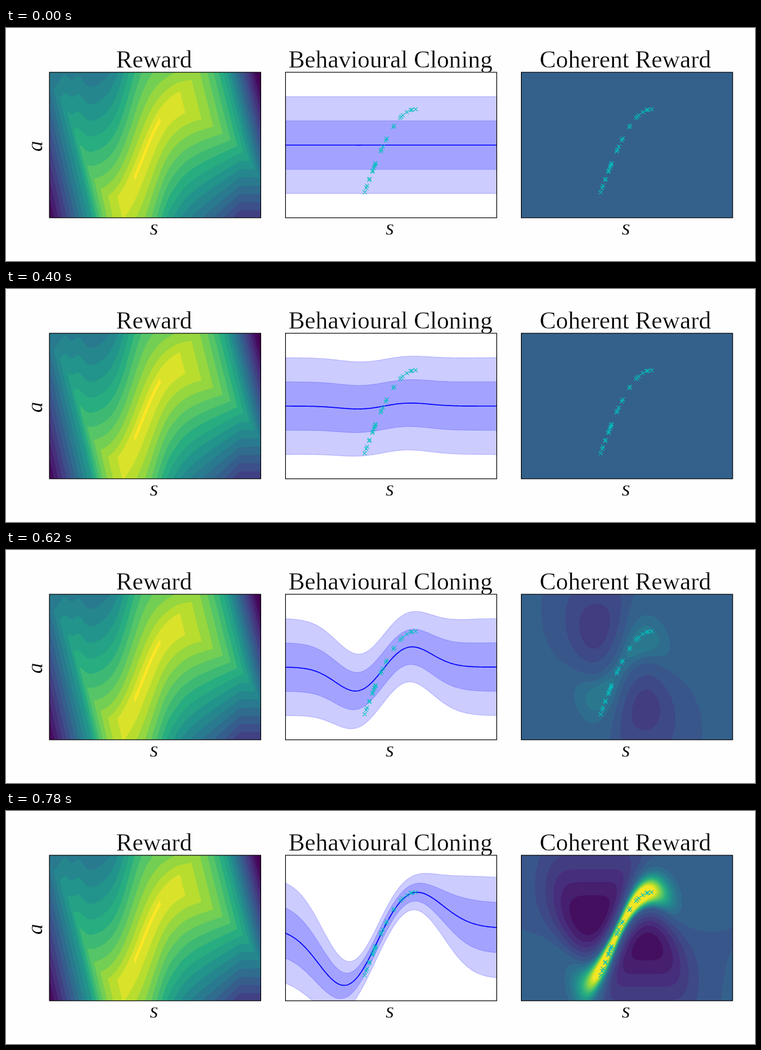
Recreate the animation shown at these times as an HTML page with a canvas. Size 1280 by 400 pixels, loop 1800 ms.

```html
<!DOCTYPE html>
<html lang="en">
<head>
<meta charset="utf-8">
<title>Coherent reward</title>
<style>
  html, body { margin: 0; width: 100%; height: 100%; overflow: hidden; background: #fefefe; }
  canvas, svg { position: absolute; top: 0; left: 0; }
  canvas { top: 76px; width: 361px; height: 250px; }
  #reward { left: 74px; }
  #coherent { left: 881px; }
  text { font-family: "Liberation Serif", "Times New Roman", serif; text-anchor: middle; stroke: #fefefe; stroke-width: .4; }
  .title { font-size: 41.7px; }
  .axis { font-size: 37px; font-style: italic; }
  .frame { fill: none; stroke: #000; stroke-width: 1.2; }
  .band { fill: #00f; fill-opacity: .2; stroke: #00f; stroke-opacity: .2; stroke-width: 1.2; }
  .mean { fill: none; stroke: #00f; stroke-width: 1.7; }
  .marks { fill: none; stroke: #00bfbf; stroke-width: 1.15; }
</style>
</head>
<body>
<canvas id="reward" width="722" height="500"></canvas>
<canvas id="coherent" width="722" height="500"></canvas>
<svg width="1280" height="400" viewBox="0 0 1280 400">
  <clipPath id="box"><rect x="477.5" y="76" width="361" height="250"/></clipPath>
  <rect x="477.5" y="76" width="361" height="250" fill="#fff"/>
  <g clip-path="url(#box)">
    <path id="wide" class="band"/>
    <path id="narrow" class="band"/>
    <path id="mean" class="mean"/>
  </g>
  <path id="marks" class="marks"/>
  <use href="#marks" x="403.2"/>
  <rect class="frame" x="74.2" y="76" width="361.2" height="249.8"/>
  <rect class="frame" x="477.6" y="76" width="361" height="249.8"/>
  <rect class="frame" x="880.6" y="76" width="361.2" height="249.8"/>
  <text class="title" x="253" y="68">Reward</text>
  <text class="title" x="657" y="68">Behavioural Cloning</text>
  <text class="title" x="1058.5" y="68">Coherent Reward</text>
  <text class="axis" x="253" y="355">s</text>
  <text class="axis" x="656" y="355">s</text>
  <text class="axis" x="1059.5" y="355">s</text>
  <text class="axis" transform="translate(62 203) rotate(-90)">a</text>
</svg>
<script>
const LOOP = 1800, STEP = 20, LAST = 780;
const MID = 201, UNIT = 250 / 6, W = 722, H = 500;
const $ = id => document.getElementById(id);
const clamp = (v, lo, hi) => Math.min(Math.max(v, lo), hi);
const gauss = z => Math.exp(-z * z / 2);

const VIRIDIS = ['440154', '472d7b', '3b528b', '2c728e', '21918c', '28ae80', '5ec962', 'addc30', 'fde725']
  .map(c => [0, 2, 4].map(i => parseInt(c.slice(i, i + 2), 16)));

// Viridis as a packed little-endian RGBA pixel.
function viridis(v) {
  const p = clamp(v, 0, 1) * 8, i = Math.min(Math.floor(p), 7);
  const [r, g, b] = VIRIDIS[i].map((c, k) => Math.round(c + (VIRIDIS[i + 1][k] - c) * (p - i)));
  return (255 << 24 | b << 16 | g << 8 | r) >>> 0;
}

function painter(id) {
  const ctx = $(id).getContext('2d'), img = ctx.createImageData(W, H);
  const px = new Uint32Array(img.data.buffer);
  return fill => { fill(px); ctx.putImageData(img, 0, 0); };
}

// Static reward: bands by depth below a curved ridge between two slanted walls.
const ridge = x => 113 + 222 / (1 + Math.exp((x - 233) / 22)) - 16 * gauss((x - 112) / 14);
const above = d => .21 * Math.pow(d, .72) - .5;
const below = d => d / 22 - .2;
const leftWall = u => u < 0 ? 8 - .14 * u : 8.4 * Math.exp(-u / 29) - .4;
const rightWall = u => u < 0 ? 8 - .2 * u : 8.8 * Math.exp(-u / 56) - .8;

painter('reward')(px => {
  const colors = Array.from({ length: 20 }, (_, k) => viridis(1 - k * .054));
  for (let i = 0; i < W; i++) {
    const x = 74 + (i + .5) / 2, top = ridge(x);
    const tilt = (ridge(x + 1) - ridge(x - 1)) / 2;
    const spread = Math.sqrt(1 + .25 * tilt * tilt) * (1 - .36 * clamp((x - 290) / 110, 0, 1));
    for (let j = 0; j < H; j++) {
      const y = 76 + (j + .5) / 2, d = (y - top) / spread;
      const deep = Math.max(
        d < 0 ? above(-d) : below(d),
        leftWall(x - .23 * (y - MID) - 118),
        rightWall(378 - x + .25 * (y - 76)));
      px[j * W + i] = colors[clamp(Math.ceil(deep), 0, 19)];
    }
  }
});

// Policy: a dip and a peak that grow while the spread narrows around the data.
const rise = (t, span, power) => Math.exp(-Math.pow((LAST - t) / span, power));

function policy(t) {
  const g = rise(t, 178, 1.43), peak = 66 * rise(t, 223, 1.7), g2 = g * g;
  const focus = x => Math.exp(-Math.LN2 * Math.pow(Math.abs(x - 655) / (75 + 22 * g), 2 + 1.2 * g));
  return {
    g, focus,
    mean: x => MID + 103 * g * gauss((x - 606 + 24 * g2) / (36 + 11 * g2))
      - peak * gauss((x - 687 - 8 * g2) / (36 + 14 * g2)),
    sigma: x => 41.6 + 1.7 * g * g2 - 30 * g * focus(x)
  };
}

const line = pts => pts.map(p => p.map(v => v.toFixed(2)).join(' ')).join('L');

function drawPolicy({ mean, sigma }) {
  const xs = Array.from({ length: 182 }, (_, i) => 477.5 + i * 2);
  const edge = k => xs.map(x => [x, mean(x) + k * sigma(x)]);
  const band = k => 'M' + line(edge(-k)) + 'L' + line(edge(k).reverse()) + 'Z';
  $('wide').setAttribute('d', band(2));
  $('narrow').setAttribute('d', band(1));
  $('mean').setAttribute('d', 'M' + line(edge(0)));
}

// Coherent reward: policy density against the unit normal prior.
const paint = painter('coherent');
const ZERO = .31, BIN = .045, NORM = 1 / Math.sqrt(2 * Math.PI);
const COLORS = Array.from({ length: 40 }, (_, k) => viridis(ZERO + BIN * (k - 10)));
const ACTION = Array.from({ length: H }, (_, j) => (MID - 76 - (j + .5) / 2) / UNIT);
const PRIOR = ACTION.map(a => NORM * gauss(a));
const PRIOR_ROOT = PRIOR.map(p => Math.pow(p, .25));

function drawCoherent({ g, focus, mean, sigma }) {
  const offset = .002 + .018 * (1 - g) * (1 - g);
  paint(px => {
    for (let i = 0; i < W; i++) {
      const x = 477.8 + (i + .5) / 2;
      const mu = (MID - mean(x)) / UNIT, sd = Math.pow(sigma(x) / UNIT, .8);
      const top = NORM / sd, trust = 1.2 * g * Math.pow(focus(x), 3 * g);
      for (let j = 0; j < H; j++) {
        const q = top * gauss((ACTION[j] - mu) / sd), gain = q - PRIOR[j];
        const v = gain < 0
          ? .36 * (Math.sqrt(Math.sqrt(q)) - PRIOR_ROOT[j])
          : Math.min(trust * gain, 1 - ZERO);
        px[j * W + i] = COLORS[Math.floor((v + offset) / BIN) + 10];
      }
    }
  });
}

// Demonstrations lie on a cosine arc that flattens at its upper end.
const DATA = [
  613, 615.7, 617, 620.7, 621.3, 626, 626.8, 628.5, 629.8, 631, 631.7, 640.3, 641.5,
  644, 649, 650.7, 662, 663.5, 673.5, 675.5, 678, 685, 691.7, 693.5, 700
];
const arc = x => 139.5 + 200 * (1 - Math.cos((700 - x) / 68));
$('marks').setAttribute('d', DATA.map(x =>
  `M${x - 3.3} ${arc(x) - 3.3}l6.6 6.6m0-6.6l-6.6 6.6`).join(''));

let shown = -1;
function draw(t) {
  const step = Math.min(Math.floor(t / STEP) * STEP, LAST);
  const time = step < 40 ? 0 : step;
  if (time === shown) return;
  shown = time;
  const now = policy(time);
  drawPolicy(now);
  drawCoherent(now);
}

const start = performance.now();
function tick() {
  draw((performance.now() - start) % LOOP);
  requestAnimationFrame(tick);
}
tick();
</script>
</body>
</html>
```
